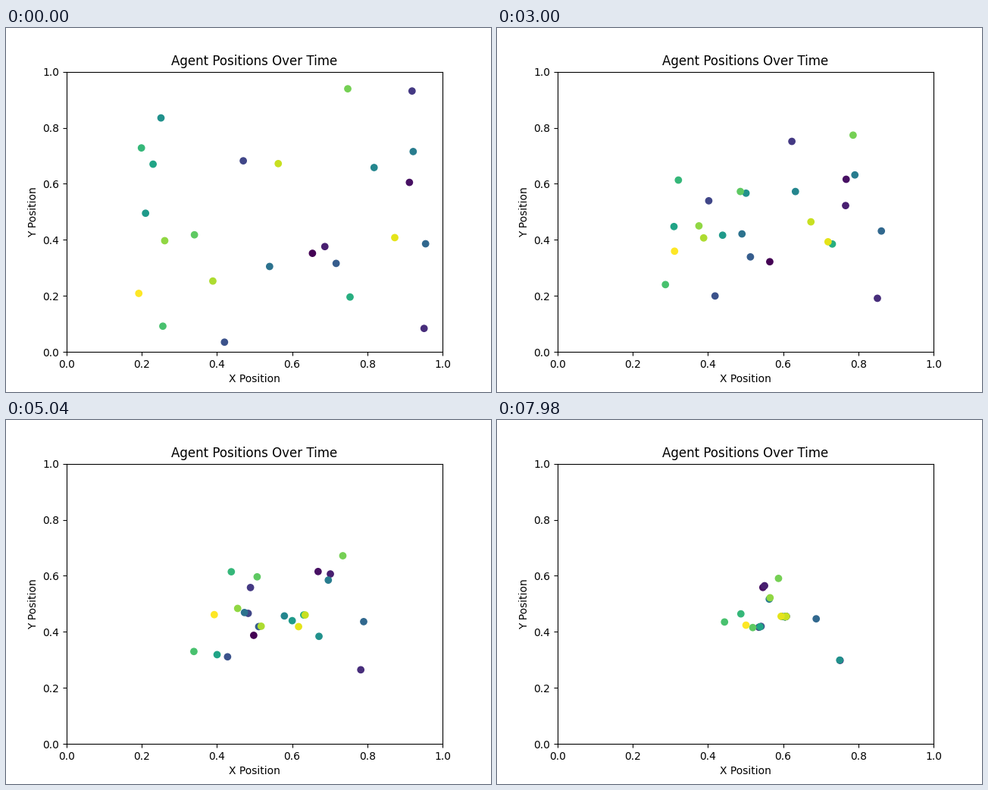
Animation of 640x480 px, one loop 8 s. Source, as a matplotlib script:

```python
import matplotlib.pyplot as plt
import numpy as np
from matplotlib.animation import FuncAnimation

STEPS = 134
TICK = 20           # ms per animation frame
TICKS_PER_STEP = 3  # one simulation step every 60 ms

# Each agent: start x, start y, speed per step, index of the agent it chases
AGENTS = [
    (0.654, 0.352, 0.00304, 7),
    (0.912, 0.605, 0.00290, 16),
    (0.687, 0.376, 0.00340, 1),
    (0.951, 0.084, 0.00294, 12),
    (0.919, 0.931, 0.00697, 14),
    (0.470, 0.682, 0.00337, 13),
    (0.420, 0.035, 0.00330, 5),
    (0.717, 0.316, 0.00419, 21),
    (0.955, 0.386, 0.00210, 22),
    (0.540, 0.305, 0.00255, 5),
    (0.922, 0.715, 0.00311, 24),
    (0.818, 0.658, 0.00411, 13),
    (0.251, 0.835, 0.00734, 3),
    (0.210, 0.495, 0.00487, 15),
    (0.230, 0.670, 0.00473, 6),
    (0.754, 0.196, 0.00387, 11),
    (0.199, 0.728, 0.00347, 18),
    (0.256, 0.092, 0.00305, 20),
    (0.340, 0.418, 0.00426, 4),
    (0.748, 0.939, 0.00344, 1),
    (0.261, 0.397, 0.00253, 10),
    (0.389, 0.253, 0.00382, 13),
    (0.563, 0.672, 0.00472, 15),
    (0.873, 0.408, 0.00311, 9),
    (0.192, 0.209, 0.00384, 18),
]


def chase(agents, steps):
    """Positions at every step; all agents move at once towards their targets."""
    data = np.array(agents)
    pos, speed, target = data[:, :2], data[:, 2], data[:, 3].astype(int)
    path = [pos]
    for _ in range(steps - 1):
        gap = pos[target] - pos
        dist = np.hypot(gap[:, 0], gap[:, 1])
        share = np.minimum(1, speed / np.maximum(dist, 1e-9))
        pos = pos + gap * share[:, None]
        path.append(pos)
    return path


path = chase(AGENTS, STEPS)

fig, ax = plt.subplots(figsize=(6.4, 4.8), dpi=100)
ax.set_xlim(0, 1)
ax.set_ylim(0, 1)
ax.set_title("Agent Positions Over Time")
ax.set_xlabel("X Position")
ax.set_ylabel("Y Position")
dots = ax.scatter(path[0][:, 0], path[0][:, 1],
                  c=np.arange(len(AGENTS)), cmap="viridis")


def update(i):
    dots.set_offsets(path[i // TICKS_PER_STEP])
    return (dots,)


anim = FuncAnimation(fig, update, frames=8000 // TICK, interval=TICK,
                     repeat=True, repeat_delay=0)
plt.show()
```
